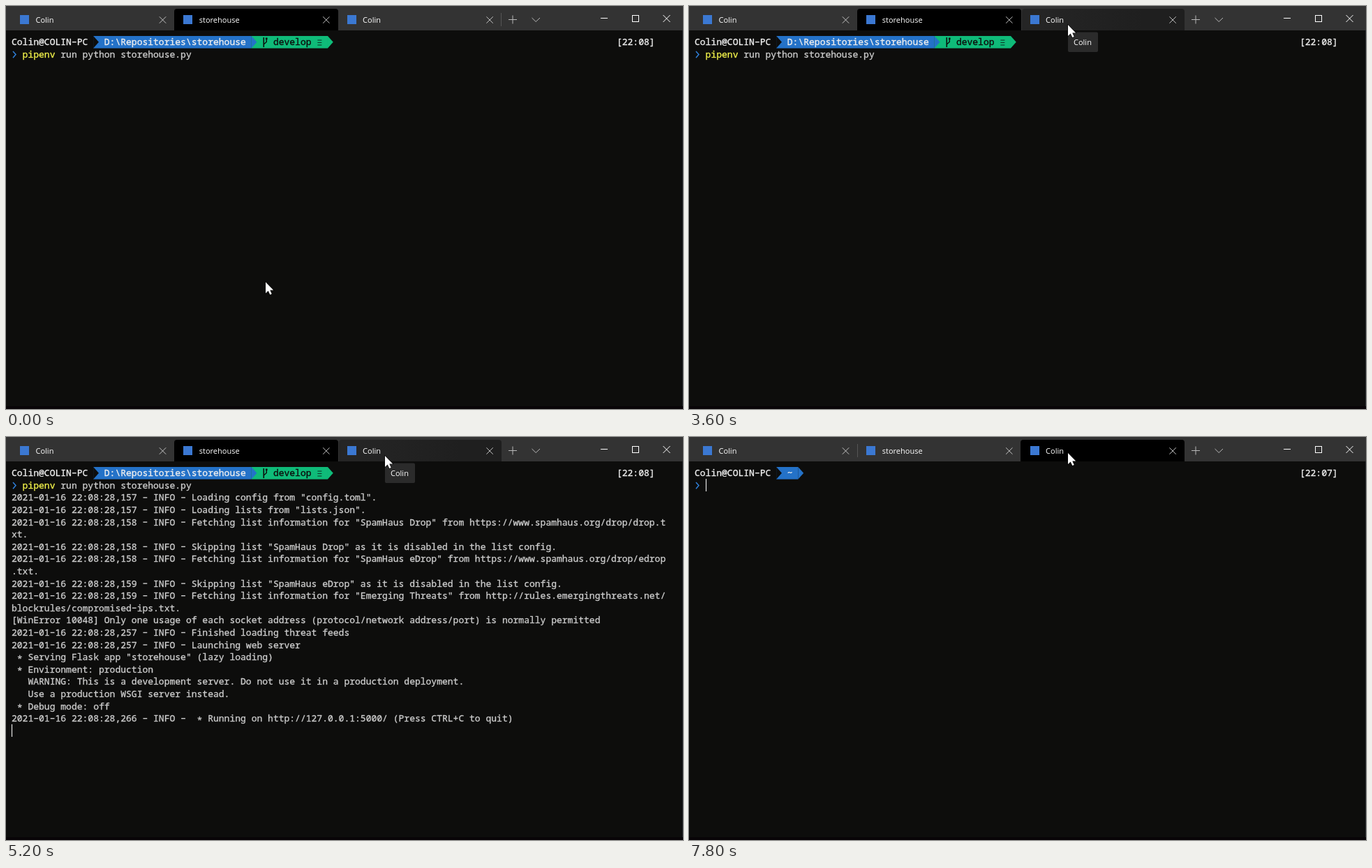
Recreate the animation shown at these times as an HTML page with a canvas. Size 970 by 578 pixels, loop 8000 ms.

```html
<!DOCTYPE html>
<html lang="en">
<head>
<meta charset="utf-8">
<title>Terminal</title>
<style>
html, body { margin: 0; width: 100%; height: 100%; overflow: hidden; background: #0d0d0c; }
canvas { display: block; }
</style>
</head>
<body>
<canvas id="stage" width="970" height="578"></canvas>
<script>
const ctx = document.getElementById('stage').getContext('2d');
const LOOP = 8000, STEP = 200;
const LEFT = 8, TOP = 43, CELL = 7.81, ROW = 17.6;
const MONO = '13px "Noto Sans Mono", "DejaVu Sans Mono", monospace';
const UI = '11px "Open Sans", "Noto Sans", sans-serif';
const BG = '#0d0d0c', FG = '#cccccc', WHITE = '#eeeeee';
const BLUE = '#2472c8', GREEN = '#0fbb79', YELLOW = '#f0f04a';
const USER = 'Colin', HOST = 'COLIN-PC';

const LOG_START = [
  '2021-01-16 22:08:28,157 - INFO - Loading config from "config.toml".',
  '2021-01-16 22:08:28,157 - INFO - Loading lists from "lists.json".',
  '2021-01-16 22:08:28,158 - INFO - Fetching list information for "SpamHaus Drop" from https://www.spamhaus.org/drop/drop.t',
  'xt.',
  '2021-01-16 22:08:28,158 - INFO - Skipping list "SpamHaus Drop" as it is disabled in the list config.',
  '2021-01-16 22:08:28,158 - INFO - Fetching list information for "SpamHaus eDrop" from https://www.spamhaus.org/drop/edrop',
  '.txt.',
  '2021-01-16 22:08:28,159 - INFO - Skipping list "SpamHaus eDrop" as it is disabled in the list config.',
  '2021-01-16 22:08:28,159 - INFO - Fetching list information for "Emerging Threats" from http://rules.emergingthreats.net/',
  'blockrules/compromised-ips.txt.'
];
const LOG_REST = [
  '[WinError 10048] Only one usage of each socket address (protocol/network address/port) is normally permitted',
  '2021-01-16 22:08:28,257 - INFO - Finished loading threat feeds',
  '2021-01-16 22:08:28,257 - INFO - Launching web server',
  ' * Serving Flask app "storehouse" (lazy loading)',
  ' * Environment: production',
  '   WARNING: This is a development server. Do not use it in a production deployment.',
  '   Use a production WSGI server instead.',
  ' * Debug mode: off',
  '2021-01-16 22:08:28,266 - INFO -  * Running on http://127.0.0.1:5000/ (Press CTRL+C to quit)'
];

const colX = c => LEFT + c * CELL;
const rowY = r => TOP + r * ROW;

function rect(x, y, w, h, color) {
  ctx.fillStyle = color;
  ctx.fillRect(x, y, w, h);
}

function trace(points, closed) {
  ctx.beginPath();
  points.forEach(([x, y], i) => i ? ctx.lineTo(x, y) : ctx.moveTo(x, y));
  if (closed) ctx.closePath();
}

function poly(points, color) {
  trace(points, true);
  ctx.fillStyle = color;
  ctx.fill();
}

function line(points, color, width = 1) {
  trace(points, false);
  ctx.strokeStyle = color;
  ctx.lineWidth = width;
  ctx.stroke();
}

function label(text, x, y, color = '#ffffff') {
  ctx.font = UI;
  ctx.fillStyle = color;
  ctx.fillText(text, x, y);
}

// Places each glyph on the terminal grid, with a thin outline for weight.
// Hyphens are wide bars and asterisks sit at mid height.
function print(text, col, row, color = FG) {
  ctx.font = MONO;
  ctx.fillStyle = ctx.strokeStyle = color;
  ctx.lineWidth = 0.35;
  ctx.lineJoin = 'round';
  [...text].forEach((ch, i) => {
    const x = colX(col + i), y = rowY(row) + 13.2;
    if (ch === ' ') return;
    if (ch === '-') {
      ctx.fillRect(x + 1, y - 5.2, CELL - 2, 1.4);
      return;
    }
    const drop = ch === '*' ? 2.5 : 0;
    ctx.fillText(ch, x, y + drop);
    ctx.strokeText(ch, x, y + drop);
  });
  ctx.lineJoin = 'miter';
}

function cross(cx, cy, r, color) {
  line([[cx - r, cy - r], [cx + r, cy + r]], color);
  line([[cx - r, cy + r], [cx + r, cy - r]], color);
}

function segment(from, to, color) {
  rect(colX(from), TOP, (to - from) * CELL, ROW, color);
}

function arrow(col, color) {
  const x = colX(col);
  poly([[x, TOP], [x + CELL, TOP + ROW / 2], [x, TOP + ROW]], color);
}

function tab(x, w, color) {
  ctx.fillStyle = color;
  ctx.beginPath();
  ctx.roundRect(x, 4, w, 31, [4, 4, 0, 0]);
  ctx.fill();
}

function titleBar(t, switched) {
  rect(0, 0, 970, 35, '#333333');
  if (switched) {
    tab(475, 235, '#000000');
    rect(241, 10, 1, 19, '#565656');
  } else {
    tab(241, 235, '#000000');
    if (t >= 2600) tab(477, 233, hoverFill(t));
    else rect(709, 10, 1, 19, '#565656');
  }
  [USER, 'storehouse', USER].forEach((name, i) => {
    const x = i * 234.3;
    rect(Math.round(x + 20), 13, 13, 13, '#3b78d2');
    label(name, x + 42.5, 24);
    cross(x + 224.5, 20, 4.7, '#c4c4c4');
  });
  line([[720, 19.5], [732, 19.5]], '#b8b8b8');
  line([[726, 13.5], [726, 25.5]], '#b8b8b8');
  line([[753.5, 17], [759.2, 22.5], [765, 17]], '#b8b8b8');
  line([[852, 17.5], [862, 17.5]], '#ffffff');
  ctx.strokeRect(897.5, 13.5, 9, 9);
  cross(946.5, 18, 5, '#ffffff');
}

// The hovered tab is a little darker away from its title, and darkens when pressed.
function hoverFill(t) {
  const press = Math.min(1, Math.max(0, (t - 7000) / 600));
  const grey = v => {
    const c = Math.round(v + (21 - v) * press);
    return `rgb(${c},${c},${c})`;
  };
  const fill = ctx.createLinearGradient(500, 0, 650, 0);
  fill.addColorStop(0, grey(37));
  fill.addColorStop(1, grey(31));
  return fill;
}

function prompt(path, time) {
  print(USER + '@' + HOST, 0, 0, WHITE);
  const end = 18 + path.length;
  segment(15, end, BLUE);
  arrow(15, BG);
  print(path, 17, 0, WHITE);
  print(time, 111, 0, WHITE);
  line([[10, 65], [14, 69.6], [10, 74.3]], '#2f7fd8', 1.5);
  return end;
}

function gitSegment(col) {
  segment(col, col + 14, GREEN);
  arrow(col, BLUE);
  arrow(col + 14, GREEN);
  const x = colX(col + 2) + 2;
  line([[x, 45], [x, 59]], BG, 1.6);
  line([[x, 55], [x + 4, 51.5], [x + 4, 47]], BG, 1.4);
  rect(x + 2.7, 45.5, 2.6, 2.6, BG);
  print('develop', col + 4, 0, BG);
  [48.5, 52, 55.5].forEach(y => rect(colX(col + 12) + 1, y, 6, 1, '#0d3326'));
}

function caret(col, row) {
  rect(Math.round(colX(col)), Math.floor(rowY(row)), 1, 18, '#ffffff');
}

function caretOn(t) {
  return (t >= 2800 && t < 3600) || (t >= 4000 && t < 4600) ||
         (t >= 5200 && t < 6000) || t >= 6800;
}

function session(t) {
  const end = prompt('D:\\Repositories\\storehouse', '[22:08]');
  gitSegment(end);
  print('pipenv', 2, 1, YELLOW);
  print('run python storehouse.py', 9, 1);
  const log = t < 4000 ? [] : t < 4200 ? LOG_START : LOG_START.concat(LOG_REST);
  log.forEach((text, i) => print(text, 0, i + 2));
  if (caretOn(t)) caret(0, log.length + 2);
}

function idleSession() {
  arrow(prompt('~', '[22:07]'), BLUE);
  caret(2, 1);
}

function tooltip(t) {
  ctx.globalAlpha = Math.min(1, (t - 3000) / 500);
  ctx.fillStyle = '#2b2b2b';
  ctx.beginPath();
  ctx.roundRect(543, 37.5, 43, 28.5, 2);
  ctx.fill();
  label(USER, 551, 56);
  ctx.globalAlpha = 1;
}

function pointerAt(t) {
  if (t >= 7800) return [543, 23];
  if (t >= 2600) return [543, 27];
  const k = Math.min(1, Math.max(0, (t - 1400) / 1000));
  const ease = k * k * (3 - 2 * k);
  return [372 + 150 * ease, 396 - 420 * ease];
}

function pointer([x, y]) {
  const shape = [[0, 0], [0, 16], [3.7, 12.6], [6.3, 18], [8.8, 17], [6.3, 11.5], [11.2, 11.5]];
  const points = shape.map(([dx, dy]) => [x + dx, y + dy]);
  trace(points, true);
  ctx.strokeStyle = '#000000';
  ctx.lineWidth = 1.2;
  ctx.stroke();
  poly(points, '#ffffff');
}

function draw(t) {
  const switched = t >= 7800;
  rect(0, 0, 970, 578, BG);
  titleBar(t, switched);
  if (switched) idleSession();
  else session(t);
  rect(969, 35, 1, 540, '#25282b');
  rect(0, 574, 970, 4, '#080407');
  if (t >= 3200 && !switched) tooltip(t);
  pointer(pointerAt(t));
}

const start = performance.now();
function tick() {
  const t = (performance.now() - start) % LOOP;
  draw(Math.floor(t / STEP) * STEP);
  requestAnimationFrame(tick);
}
tick();
</script>
</body>
</html>
```
